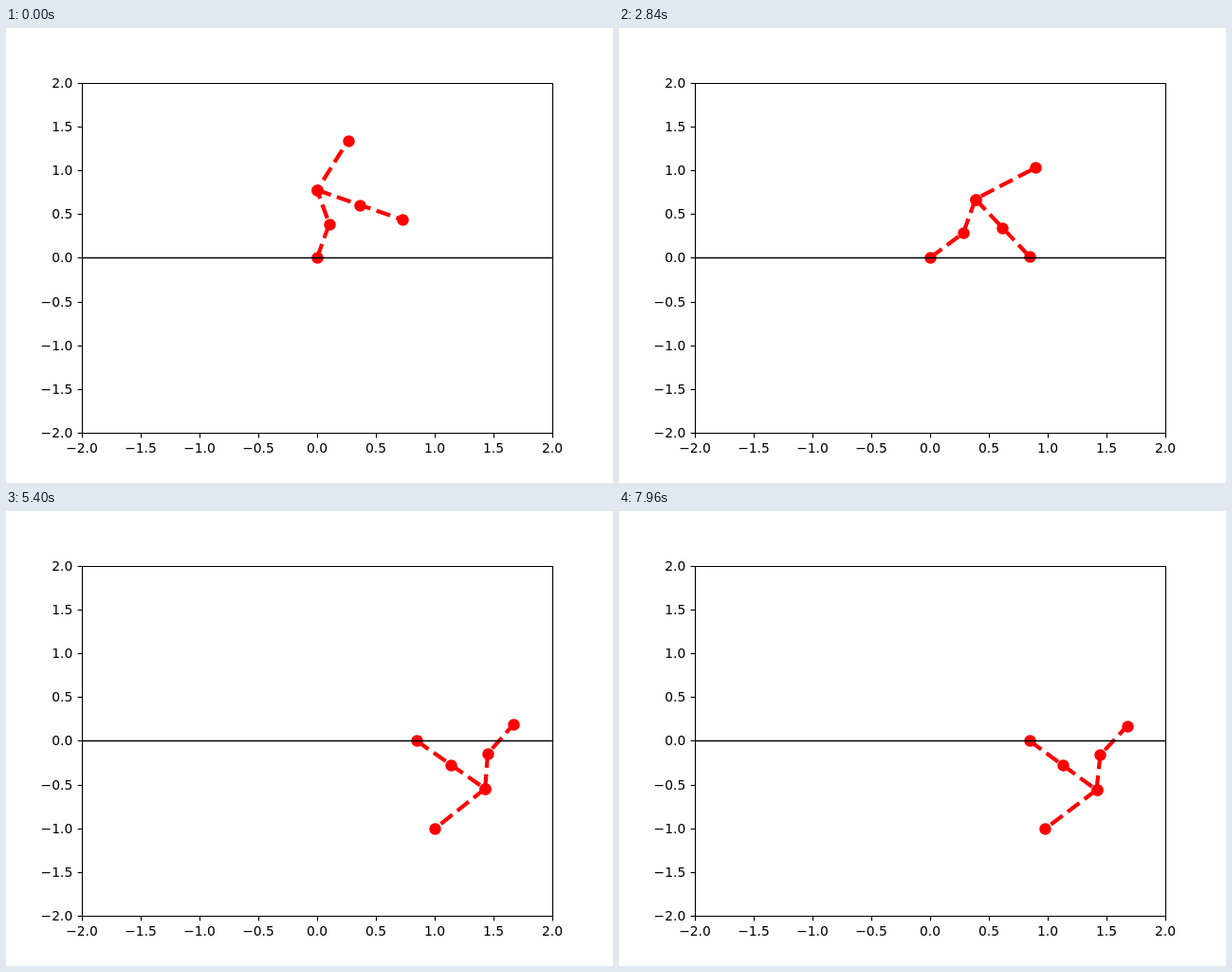
Write an HTML page with a canvas that moves like this. It is 640x480 px and loops after 8 s.

```html
<!DOCTYPE html>
<html lang="en">
<head>
<meta charset="utf-8">
<title>Tumbling walker</title>
<style>
  html, body { margin: 0; width: 100%; height: 100%; overflow: hidden; background: #fff; }
  canvas { display: block; }
</style>
</head>
<body>
<canvas id="stage" width="640" height="480"></canvas>
<script>
const ctx = document.getElementById('stage').getContext('2d');
const RAD = Math.PI / 180;
const LOOP = 8, FRAME = 0.04;
const STEP = 0.8453; // distance between the feet

// Joint angles are degrees clockwise from up, before the body turns.
const LEGS = {
  a: { shin: 15, thigh: -15 },
  b: { shin: -65, thigh: -65 }
};
const TORSO = 25, LEG = 0.4, TORSO_LENGTH = 0.625;

// The rigid body swings on one foot at a time: turn'' = k * sin(turn - top).
const PHASES = [
  { start: 0, foot: 'a', x: 0, turn: 0, speed: 0, k: 0.57, top: -9.15 },
  { start: 2.94, foot: 'b', x: STEP, turn: 32.6, speed: 1.038, k: 0.67, top: 66 },
  { start: 5.54, foot: 'a', x: 2 * STEP, turn: 213.7, speed: 0.092, k: 0.57, top: -9.15 },
  { start: 6.404, foot: 'b', x: STEP, turn: 210.7, speed: -0.4545, k: 0.61, top: 66 }
];

const px = x => 328 + 124 * x;
const py = y => 242.4 - 92.4 * y;
const snap = v => Math.round(v) + 0.5;

function turnAt(phase, time) {
  const steps = 400, h = (time - phase.start) / steps;
  const pull = a => phase.k * Math.sin(a - phase.top * RAD);
  let angle = phase.turn * RAD, speed = phase.speed;
  for (let i = 0; i < steps; i++) {
    speed += pull(angle) * h / 2;
    angle += speed * h;
    speed += pull(angle) * h / 2;
  }
  return angle / RAD;
}

function poseAt(time) {
  const phase = PHASES.filter(p => p.start <= time).pop();
  const turn = turnAt(phase, time);
  const move = ([x, y], angle, length) => [
    x + length * Math.sin((angle + turn) * RAD),
    y + length * Math.cos((angle + turn) * RAD)
  ];
  const stance = LEGS[phase.foot], swing = LEGS[phase.foot === 'a' ? 'b' : 'a'];
  const foot = [phase.x, 0];
  const knee = move(foot, stance.shin, LEG);
  const hip = move(knee, stance.thigh, LEG);
  const head = move(hip, TORSO, TORSO_LENGTH);
  const swingKnee = move(hip, swing.thigh, -LEG);
  const swingFoot = move(swingKnee, swing.shin, -LEG);
  return [[foot, knee, hip, head], [hip, swingKnee, swingFoot]];
}

function line(x1, y1, x2, y2, width = 1.11) {
  ctx.lineWidth = width;
  ctx.beginPath();
  ctx.moveTo(x1, y1);
  ctx.lineTo(x2, y2);
  ctx.stroke();
}

function drawChain(points) {
  ctx.strokeStyle = ctx.fillStyle = '#f00';
  ctx.lineWidth = 4.17;
  ctx.lineJoin = 'round';
  ctx.setLineDash([15.42, 6.67]);
  ctx.beginPath();
  for (const [x, y] of points) ctx.lineTo(px(x), py(y));
  ctx.stroke();
  ctx.setLineDash([]);
  for (const [x, y] of points) {
    ctx.beginPath();
    ctx.arc(snap(px(x)), snap(py(y)), 6.25, 0, 2 * Math.PI);
    ctx.fill();
  }
}

function drawAxes() {
  ctx.strokeStyle = ctx.fillStyle = '#000';
  line(80, 242.5, 576, 242.5, 1.39);
  ctx.lineWidth = 1.11;
  ctx.strokeRect(80.5, 58.5, 496, 369);
  ctx.font = '13.89px "DejaVu Sans", sans-serif';
  for (let v = -2; v <= 2; v += 0.5) {
    const label = v.toFixed(1).replace('-', '\u2212');
    const x = snap(px(v)), y = snap(py(v));
    line(x, 427.5, x, 432.4);
    line(75.6, y, 80.5, y);
    ctx.textAlign = 'center';
    ctx.fillText(label, px(v), 448);
    ctx.textAlign = 'right';
    ctx.fillText(label, 70.3, Math.round(py(v) + 5));
  }
}

function draw() {
  const frame = Math.floor(performance.now() / 1000 % LOOP / FRAME + 1e-6);
  ctx.fillStyle = '#fff';
  ctx.fillRect(0, 0, 640, 480);
  poseAt(frame * FRAME).forEach(drawChain);
  drawAxes();
  requestAnimationFrame(draw);
}
draw();
</script>
</body>
</html>
```
